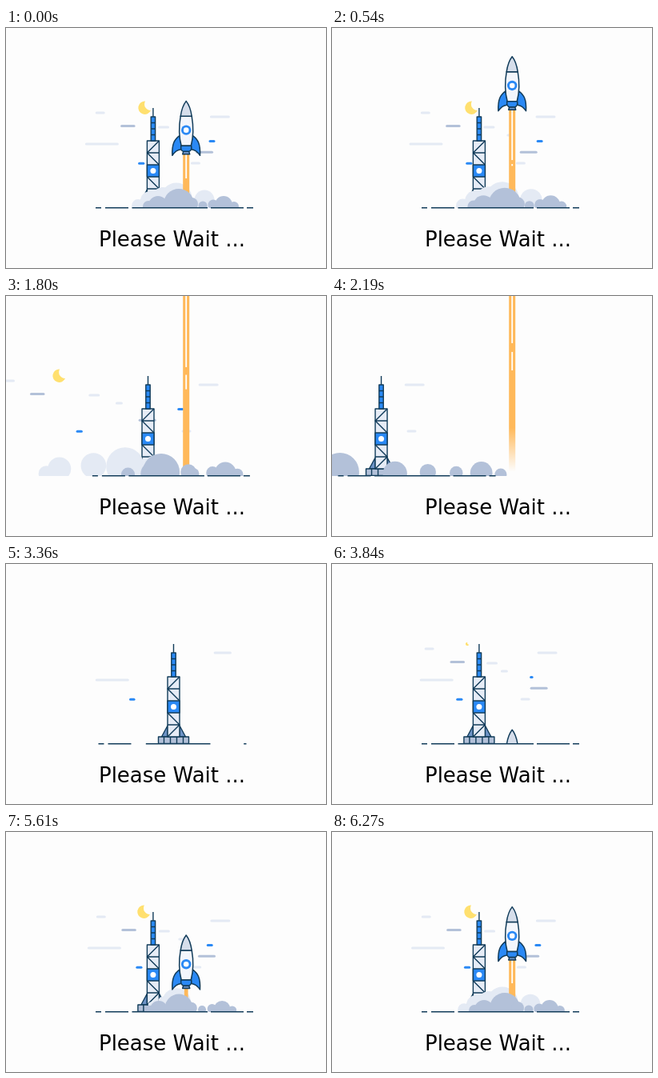
Write an HTML page with a canvas that moves like this. It is 400 by 300 pixels and loops after 6300 ms.

```html
<!DOCTYPE html>
<html lang="en">
<head>
<meta charset="utf-8">
<title>Please Wait</title>
<style>
html, body { margin: 0; width: 100%; height: 100%; overflow: hidden; background: #fdfdfd; }
canvas, svg { position: absolute; left: 0; top: 0; width: 400px; height: 300px; display: block; }
text { font: 26px "DejaVu Sans", sans-serif; text-anchor: middle; }
</style>
</head>
<body>
<canvas id="stage"></canvas>
<svg viewBox="0 0 400 300"><text x="207.5" y="273">Please Wait ...</text></svg>
<script>
const LOOP = 6.3, BASE = 224.7;
const INK = '#123c5a', BLUE = '#2a89f5', LIGHT = '#e4eaf4', DARK = '#b3c1d9';
const canvas = document.getElementById('stage');
const c = canvas.getContext('2d');
const dpr = window.devicePixelRatio || 1;
canvas.width = 400 * dpr;
canvas.height = 300 * dpr;

const clamp = v => Math.min(1, Math.max(0, v));
const easeOut = p => 1 - (1 - clamp(p)) ** 3;
// Distance flown to the left once a part starts to leave
const gone = (t, start) => 506 * Math.max(0, t - start) ** 3;

// x, y, width, colour, drift per second, grow-in time, leave time
const streaks = [
  [106, 145, 42, LIGHT, -4.4, 3.07, 7.25],
  [114.3, 106, 12, LIGHT, -1.6, 3.42, 7.5],
  [146, 122.5, 18.5, DARK, -1.8, 3.4, 7.5],
  [192, 124, 14, LIGHT, -1.2, 3.42, 7.55],
  [213, 134, 9, LIGHT, 2.5, 3.45, 7.55],
  [256, 111, 25, LIGHT, -0.7, 3.23, 7.806],
  [244, 155.3, 22, DARK, -4.3, 3.42, 7.6],
  [234, 169, 12, LIGHT, -1.9, 3.45, 7.85],
  [247, 141.4, 8, BLUE, 4, 3.78, 7.65],
  [158.6, 169.2, 8.2, BLUE, 4, 3.22, 7.55]
];

// x, y, radius, appear time, leave time
const backPuffs = [
  [165, 222, 8, 5.6, 7.5], [180, 216, 12, 5.5, 7.5], [196, 212, 13, 5.4, 7.55],
  [213, 213, 19.5, 4.8, 7.6], [248, 215, 13, 5.7, 7.6], [257, 221, 7, 5.8, 7.6]
];
const frontPuffs = [
  [178, 223, 7, 4.9, 7.75], [190, 222, 12, 4.75, 7.893], [216, 220, 19, 4.65, 7.75],
  [232, 220, 8, 4.5, 7.883], [246, 222, 5.5, 4.8, 7.8], [259, 221, 6.5, 4.75, 7.893],
  [272, 221, 11, 4.65, 7.926], [285, 223, 6, 4.7, 7.947]
];

// left, right, grow-in time
const ground = [[112, 119, 3.07], [124, 153, 3.07], [157.5, 252, 3.205], [256, 297, 3.352], [301, 309, 3.4]];

const moonShape = new Path2D('M174 91.5A8.2 8.2 0 1 0 181 103A7.8 7.8 0 0 1 174 91.5z');
const towerLines = new Path2D(
  'M-7.5 156H7.5M-7.5 201H7.5M7.5 141L-7.5 156L7.5 171M-7.5 186L7.5 201L-7.5 216' +
  'M-2.7 118.5H2.7M-2.7 126H2.7M-2.7 133.5H2.7M0 100V111');
const baseLines = new Path2D('M-12 216V224.5M-4 216V224.5M4 216V224.5M12 216V224.5');
const braces = new Path2D('M-7.5 202L-15 216H-7.5zM7.5 202L15 216H7.5z');
const nose = new Path2D('M0 0C-4 5-6 12-7 19H7C6 12 4 5 0 0z');
const hull = new Path2D('M-7 19C-9.5 33-9 45-6 56H6C9 45 9.5 33 7 19z');
const fins = new Path2D(
  'M-8 43C-15 48-18 54-17.3 68C-14 63-11 61-6.5 60.5L-6 56z' +
  'M8 43C15 48 18 54 17.3 68C14 63 11 61 6.5 60.5L6 56z');
const band = new Path2D('M-6.5 56H6.5L6.5 60Q5 63 3.5 63H-3.5Q-5 63-6.5 60z');
const nozzle = new Path2D('M-3.5 63H3.5L4.5 66.5H-4.5z');

function at(x, y, draw) {
  c.save();
  c.translate(x, y);
  draw();
  c.restore();
}

function shape(path, fill) {
  c.fillStyle = fill;
  c.fill(path);
  c.stroke(path);
}

function box(x, y, w, h, fill) {
  const p = new Path2D();
  p.rect(x, y, w, h);
  shape(p, fill);
}

function disc(x, y, r, fill) {
  c.fillStyle = fill;
  c.beginPath();
  c.arc(x, y, r, 0, 7);
  c.fill();
}

function pen(color, width) {
  c.strokeStyle = color;
  c.lineWidth = width;
  c.lineJoin = 'round';
}

function drawStreaks(t) {
  for (const [x, y, w, color, drift, start, leave] of streaks) {
    const len = w * easeOut((t - start) / 0.25);
    if (len <= 0) continue;
    const right = x + w + drift * (t - 4.68) - gone(t, leave);
    c.fillStyle = color;
    c.beginPath();
    c.roundRect(right - len, y - 1.5, len, 3, Math.min(1.5, len / 2));
    c.fill();
  }
}

function drawMoon(t) {
  const s = easeOut((t - 3.8) / 0.4);
  if (!s) return;
  at(173 + 1.6 * (t - 6.3) - gone(t, 7.5), 100, () => {
    c.scale(s, s);
    c.translate(-173, -100);
    c.fillStyle = '#ffe06f';
    c.fill(moonShape);
  });
}

function drawTower(t) {
  const enter = 236 * (1 - easeOut((t - 3.09) / 0.518));
  at(183.9 + enter - gone(t, 7.868), 0, () => {
    pen(INK, 1.4);
    shape(braces, '#6d93c6');
    box(-19, 216, 38, 8.5, DARK);
    c.stroke(baseLines);
    box(-7.5, 141, 15, 75, '#e6ecf6');
    box(-2.7, 111, 5.4, 30, BLUE);
    c.stroke(towerLines);
    box(-7.5, 171, 15, 15, BLUE);
    disc(0, 178.5, 3.5, '#fff');
  });
}

function rocketTip(t) {
  const rest = 13.3 * (Math.exp(1.05 * (Math.max(t, 4.38) - 4.68)) - 1);
  return 151 - rest + 75 * (1 - easeOut((t - 3.78) / 0.55));
}

function drawFlame(t, tip) {
  if (t < 4.45) return;
  const top = Math.max(-5, tip + 66);
  const edge = 225 - 1040 * Math.max(0, t - 8.25) ** 2;
  if (edge < -55) return;
  const strip = (rgb, y1, y2, w) => {
    if (y2 <= y1) return;
    const g = c.createLinearGradient(0, edge, 0, edge + 55);
    g.addColorStop(0, `rgba(${rgb},1)`);
    g.addColorStop(1, `rgba(${rgb},0)`);
    c.fillStyle = g;
    c.fillRect(225.2 - w / 2, y1, w, y2 - y1);
  };
  strip('255,185,90', top, 224, 4 + 4 * clamp((t - 5.5) / 0.6));
  if (t < 5.8) return;
  const s = t - LOOP, end = 188 - 37 * s - 10 * s * s;
  const next = end + 7 + 3.6 * (s - 1.08);
  strip('255,255,255', top, end, 1.8);
  strip('255,255,255', Math.max(top, next), next + 9 + 12.6 * (s - 1.08), 1.8);
}

function drawRocket(t, tip) {
  if (t < 3.78 || tip < -80) return;
  at(225.2, tip, () => {
    pen(INK, 1.5);
    shape(nozzle, '#6d93c6');
    shape(fins, BLUE);
    shape(hull, '#f3f6fc');
    shape(nose, '#d6deeb');
    shape(band, BLUE);
    disc(0, 36.3, 6.2, BLUE);
    disc(0, 36.3, 3.3, '#fff');
  });
}

function drawPuffs(t, puffs, color) {
  for (const [x, y, r, start, leave] of puffs) {
    const s = t - LOOP;
    const size = r * easeOut((t - start) / 0.9) * (1 + 0.12 * s);
    if (size > 0) disc(x + (x - 218) * 0.05 * s - gone(t, leave), y, size, color);
  }
}

function drawGround(t) {
  const shift = 3.5 * (1 - easeOut((t - 3.36) / 0.35)) - gone(t, 7.9);
  pen(INK, 1.6);
  c.beginPath();
  for (const [a, b, start] of ground) {
    const len = (b - a) * easeOut((t - start) / 0.33);
    if (len <= 0) continue;
    c.moveTo(b + shift - len, BASE);
    c.lineTo(b + shift, BASE);
  }
  c.stroke();
}

function frame(now) {
  let t = now / 1000 % LOOP;
  if (t < 3) t += LOOP; // one launch runs from 3 s to 9.3 s
  const tip = rocketTip(t);
  c.setTransform(dpr, 0, 0, dpr, 0, 0);
  c.fillStyle = '#fdfdfd';
  c.fillRect(0, 0, 400, 300);
  c.save();
  c.beginPath();
  c.rect(0, 0, 400, 225);
  c.clip();
  drawStreaks(t);
  drawMoon(t);
  drawTower(t);
  drawPuffs(t, backPuffs, LIGHT);
  drawFlame(t, tip);
  drawRocket(t, tip);
  drawPuffs(t, frontPuffs, DARK);
  c.restore();
  drawGround(t);
}

const begin = performance.now();
(function tick() {
  frame(performance.now() - begin);
  requestAnimationFrame(tick);
})();
</script>
</body>
</html>
```
